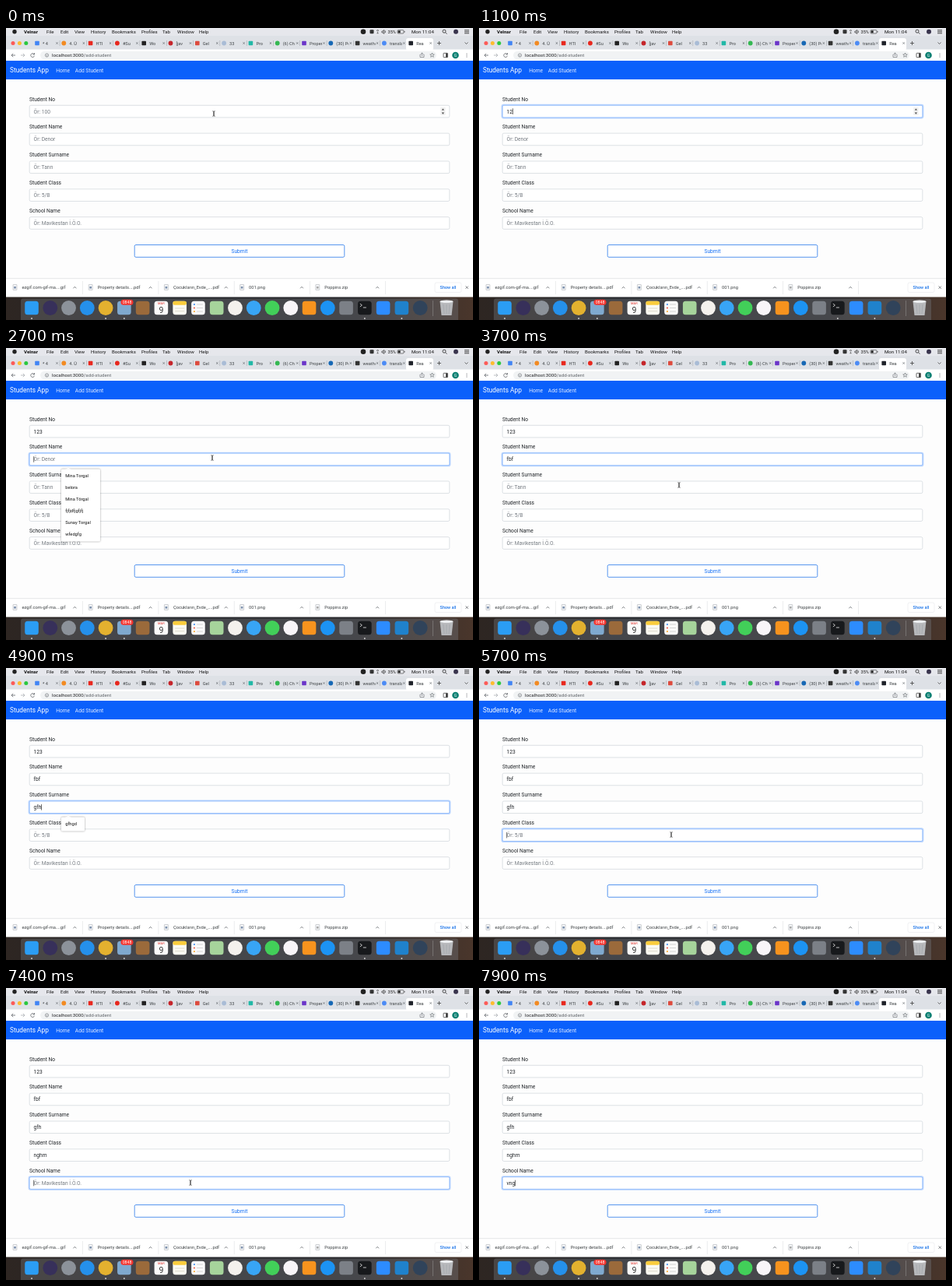
An HTML page for the animation above (8000 ms loop, 600 by 375 pixels).

```html
<!DOCTYPE html>
<html lang="en">
<head>
<meta charset="utf-8">
<title>Add Student</title>
<style>
html, body { margin: 0; width: 100%; height: 100%; overflow: hidden; background: #fdfdfd; }
svg { display: block; width: 600px; height: 375px; font-family: Roboto, "Liberation Sans", sans-serif; }
text { white-space: pre; }
</style>
</head>
<body>
<svg viewBox="0 0 600 375"><g id="base"></g><g id="live"></g></svg>
<script>
const LOOP = 8000, STEP = 100, BLUE = '#0b60fb', FORM = 6.67;

// Shape helpers; text is placed by its vertical centre.
const rect = (x, y, w, h, fill, r = 0, extra = '') =>
  `<rect x="${x}" y="${y}" width="${w}" height="${h}" rx="${r}" fill="${fill}" ${extra}/>`;
const disc = (x, y, r, fill, extra = '') =>
  `<circle cx="${x}" cy="${y}" r="${r}" fill="${fill}" ${extra}/>`;
const line = (d, stroke = '#5f6368', w = 0.8, extra = '') =>
  `<path d="${d}" fill="none" stroke="${stroke}" stroke-width="${w}" ${extra}/>`;
const text = (x, y, s, size, fill = '#212529', extra = '') =>
  `<text x="${x}" y="${y + size * 0.36}" font-size="${size}" fill="${fill}" ${extra}>${s}</text>`;
const cross = (x, y, r, color, w) =>
  line(`M${x - r} ${y - r}l${2 * r} ${2 * r}m0 ${-2 * r}l${-2 * r} ${2 * r}`, color, w);

const fields = [
  { label: 'Student No', hint: 'Ör: 100', value: '123', focus: 500, keys: [900, 1000, 1300] },
  { label: 'Student Name', hint: 'Ör: Denor', value: 'fbf', focus: 2300, keys: [2900, 3000, 3100] },
  { label: 'Student Surname', hint: 'Ör: Tarın', value: 'gfh', focus: 3900, keys: [4500, 4700, 4800] },
  { label: 'Student Class', hint: 'Ör: 5/B', value: 'nghm', focus: 5600, keys: [6000, 6100, 6300, 6400] },
  { label: 'School Name', hint: 'Ör: Mavikestan İ.Ö.O.', value: 'vng', focus: 7000, keys: [7500, 7600, 7700] }
];
fields.forEach((f, i) => f.y = 107.1 + 35.85 * i);

const menus = [
  { field: 1, from: 2300, to: 2900, width: 50,
    rows: ['Mina Torgal', 'belora', 'Mina Törgal', 'fjfjdfjgfjfj', 'Sunay Torgal', 'wfedgfg'] },
  { field: 1, from: 2900, to: 3000, width: 50, rows: ['fjfjdfjgfjfj'] },
  { field: 2, from: 4500, to: 5500, width: 30, rows: ['gfhgd'] }
];

// Pointer path as [time, x, y]; it hides while keys are pressed.
const path = [
  [0, 267, 110], [400, 267, 108], [1700, 266, 107], [2300, 265, 141], [3300, 265, 141],
  [3700, 257, 176], [3900, 257, 179], [5000, 257, 179], [5500, 247, 214],
  [6500, 247, 214], [6700, 237, 244], [6900, 237, 250], [LOOP, 237, 250]
];
const hidden = [[900, 1700], [2900, 3300], [4500, 5000], [6000, 6500], [7500, LOOP]];

function menuBar() {
  const items = [[52, 'File'], [70, 'Edit'], [88, 'View'], [109, 'History'], [136, 'Bookmarks'],
    [174, 'Profiles'], [201, 'Tab'], [220, 'Window'], [248, 'Help']];
  return rect(0, 0, 600, 10, '#e6e7ec') + disc(11, 4.8, 2.7, '#222') +
    text(23, 4.8, 'Velnar', 6.2, '#111', 'font-weight="700"') +
    items.map(([x, s]) => text(x, 4.8, s, 6.1, '#111')).join('') +
    disc(459, 4.8, 3.3, '#222') + rect(467.5, 2.3, 5, 5, '#333', 1) +
    line('M476 3.5q1.5-1.5 3 0m-2 1.6h1m-1.5 1.6h2', '#333') +
    line('M483 4v2h1.2l1.5 1.4V2.6L484.200 4zM487 3.300q1 1.500 0 3', '#222', 0.7) +
    text(490.500, 4.8, '35%', 5.6, '#111') +
    rect(503, 2.7, 8, 4.3, 'none', 1, 'stroke="#333" stroke-width=".6"') +
    rect(503.7, 3.4, 3, 2.9, '#222') + rect(511.6, 4, 0.8, 1.6, '#333') +
    text(521, 4.8, 'Mon 11:04', 6.1, '#111') +
    disc(563, 4.2, 2, 'none', 'stroke="#222" stroke-width=".8"') + line('M564.500 5.700l2 2', '#222') +
    disc(578, 4.8, 3, '#39344d') + line('M589 2.800h6m-6 2h6m-6 2h6', '#222');
}

function tabs() {
  const list = [['* 4', '#4285f4'], ['4. \u00dc', '#f28b23'], ['HTI', '#e8281e'], ['#Su', '#e8281e'],
    ['Wo', '#222'], ['[jav', '#c5252b'], ['Gel', '#dd4b3e'], ['33', '#a9bcd6'], ['Pro', '#22b8a7'],
    ['(6) Ch', '#34b852'], ['Proper', '#6b35c9'], ['(30) Po', '#1768b5'], ['weathe', '#333'],
    ['transla', '#4c8bf5'], ['Rea', '#20232a']];
  let out = rect(0, 10, 600, 18, '#dee1e6') + rect(514, 13, 35, 16, '#fff', 3);
  ['#fc5b57', '#fdbc2e', '#2bc840'].forEach((c, i) => out += disc(9 + 8.4 * i, 19.5, 2.5, c));
  list.forEach(([s, color], i) => {
    const x = 40 + 34.3 * i;
    out += i % 2 ? disc(x, 19.5, 2.9, color) : rect(x - 2.8, 16.7, 5.6, 5.6, color, 0.8);
    out += `<svg x="${x + 6}" y="14" width="17" height="11">${text(1, 5.5, s, 5.6, '#3c4043')}</svg>`;
    out += cross(x + 25.5, 19.5, 1.2, '#4b4f54', 0.6);
    if (i < 13) out += rect(x + 28.8, 16, 0.5, 7, '#9b9fa5');
  });
  return out + line('M554 19.500h5m-2.500-2.500v5', '#444') + line('M589.500 18.500l2 2 2-2', '#444');
}

function toolbar() {
  return rect(0, 27.5, 600, 15, '#fff') + rect(44, 29.700, 509, 10.6, '#f1f3f4', 5.3) +
    line('M12 35H7m2.200-2.200L7 35l2.200 2.200') +
    line('M19 35h5m-2.200-2.200L24 35l-2.200 2.200', '#a9adb2') +
    line('M36 33.500a2.400 2.400 0 1 0 .5 2.200m0-3.700v2h-2') +
    disc(52.5, 35, 2.1, 'none', 'stroke="#5f6368" stroke-width=".6"') + rect(52.2, 34.600, 0.6, 1.6, '#5f6368') +
    text(59, 35, 'localhost:3000<tspan fill="#5f6368">/add-student</tspan>', 6.2, '#202124') +
    line('M533 34h-1v3.500h5V34h-1m-1.500 2v-4m-1.300 1.200l1.300-1.300 1.300 1.300', '#5f6368', 0.6) +
    line('M547.500 32l.8 1.900 2 .1-1.600 1.300.6 2-1.800-1.100-1.800 1.100.6-2-1.600-1.300 2-.1z', '#5f6368', 0.6) +
    rect(562, 32.300, 5.4, 5.400, 'none', 0.5, 'stroke="#444" stroke-width=".8"') + rect(565, 32.300, 2.4, 5.4, '#444') +
    disc(577.500, 35, 4.3, '#0b8073') + text(577.500, 35, 'G', 5, '#fff', 'text-anchor="middle"') +
    [-2, 0, 2].map(d => disc(592, 35 + d, 0.6, '#5f6368')).join('');
}

function page() {
  return rect(0, 42, 600, 24, BLUE) + text(5, 54.5, 'Students App', 8.33, '#fff') +
    text(64.2, 54.5, 'Home', FORM, '#dfe9ff') + text(88.800, 54.5, 'Add Student', FORM, '#dfe9ff') +
    fields.map(f => text(30, f.y - 16, f.label, FORM)).join('') +
    rect(165.2, 278.500, 269.6, 15.8, '#fff', 1.7, 'stroke="#2c7ceb" stroke-width=".8"') +
    text(300, 286.5, 'Submit', FORM, '#1470f5', 'text-anchor="middle"');
}

function downloads() {
  const files = ['ezgif.com-gif-ma....gif', 'Property details....pdf', 'Çocukların_Evde_....pdf', '001.png', 'Poppins.zip'];
  let out = rect(0, 321.5, 600, 24, '#fff') + rect(0, 321.5, 600, 0.6, '#d5d7da');
  files.forEach((s, i) => {
    const x = 97.2 * i;
    out += rect(x + 9, 329.5, 5, 7, '#f3f4f6', 0.4, 'stroke="#a5a9af" stroke-width=".5"') +
      rect(x + 10.2, 332, 2.6, 2.6, i < 4 ? '#7d91ad' : '#aaa') +
      text(x + 20.5, 333.2, s, 5.75, '#3c4043') +
      line(`M${x + 86.5} 334.300l1.900-2 1.900 2`) + rect(x + 98.5, 325, 0.5, 17, '#d8dadd');
  });
  return out + rect(551, 327, 34, 12.5, '#fff', 2, 'stroke="#e1e3e6" stroke-width=".5"') +
    text(568, 333.2, 'Show all', 5.5, '#1a73e8', 'text-anchor="middle" font-weight="500"') +
    cross(592.2, 333.2, 1.7, '#55595e', 0.7);
}

function dock() {
  const y = 359.5;
  const tile = (x, color) => rect(x - 8.8, y - 8.8, 17.6, 17.6, color, 3.5);
  const round = (x, color) => disc(x, y, 9.4, color);
  const icons = [[tile, '#2b9df4'], [round, '#37305a'], [round, '#8c929a'], [round, '#2590ea'], [round, '#e3b12f'],
    [tile, '#7fa9cf'], [tile, '#9b6a3b'], [tile, '#fafafa'], [tile, '#fbfaf2'], [tile, '#fafafa'],
    [tile, '#a6d49b'], [round, '#f4f1ed'], [round, '#38a5f5'], [round, '#42cf59'], [round, '#f8f5f8'],
    [tile, '#f7931e'], [round, '#1c93f3'], [tile, '#7c8087'], [tile, '#17191c'], [tile, '#2d8cff'],
    [tile, '#1f82cc'], [round, '#30435a']];
  const at = i => 33 + 23.77 * i;
  let out = `<defs><linearGradient id="desk"><stop stop-color="#2e2622"/><stop offset=".3" stop-color="#25272c"/>
    <stop offset=".75" stop-color="#29292c"/><stop offset="1" stop-color="#4a362b"/></linearGradient></defs>` +
    rect(0, 345.500, 600, 30, 'url(#desk)') + rect(19, 347.5, 562, 30, '#77797f', 3, 'opacity=".38"');
  icons.forEach(([draw, color], i) => out += draw(at(i), color));
  [0, 4, 5, 18, 20].forEach(i => out += disc(at(i), 373, 0.9, '#ddd'));

  // Plain details: badge, calendar, notes, list, prompt and bin.
  out += rect(147.500, 348.8, 16, 7, '#f6352f', 3.500) + text(155.500, 352.3, '0848', 5.2, '#fff', 'text-anchor="middle"');
  out += text(at(7), 354, 'MAR', 4, '#e33b35', 'text-anchor="middle"') +
    text(at(7), 362, '9', 10.5, '#333', 'text-anchor="middle"');
  out += rect(at(8) - 8.8, 350.7, 17.6, 5, '#fbcd3c', 2) + line(`M${at(8) - 6} 360h12m-12 3.500h12`, '#c9c6bb', 0.6);
  [355, 359.5, 364].forEach((py, i) =>
    out += disc(at(9) - 5, py, 1.1, ['#3a8cf1', '#f25a4b', '#f7a52b'][i]) + line(`M${at(9) - 2} ${py}h8`, '#bbb', 0.6));
  out += line(`M${at(18) - 6} 354l2.500 2-2.500 2m4 1h4`, '#eee', 0.8);
  out += rect(548.5, 350, 0.5, 20, '#999');
  return out + '<path d="M557.500 351h17l-2 18h-13z" fill="#c9ccd0" opacity=".85"/>' +
    '<ellipse cx="566" cy="351.300" rx="8.500" ry="1.800" fill="#eceef0"/>' +
    line('M562 355l1 12m3-12v12m4-12l-1 12', '#9da1a6', 0.6);
}

const ruler = document.createElement('canvas').getContext('2d');
function widthOf(s) {
  ruler.font = '100px Roboto, "Liberation Sans", sans-serif';
  return ruler.measureText(s).width * FORM / 100;
}

function pointerAt(t) {
  if (hidden.some(([a, b]) => t >= a && t < b)) return null;
  const i = path.findIndex(p => p[0] > t);
  const [t0, x0, y0] = path[i - 1], [t1, x1, y1] = path[i];
  const k = (t - t0) / (t1 - t0), e = k * k * (3 - 2 * k);
  return [x0 + (x1 - x0) * e, y0 + (y1 - y0) * e];
}

function input(f, i, t, active, hover) {
  const typed = f.value.slice(0, f.keys.filter(k => k <= t).length);
  let out = '';
  if (active) out += rect(28.6, f.y - 9.3, 542.8, 18.6, '#bcd6fe', 2.8);
  out += rect(30.2, f.y - 7.8, 539.6, 15.6, '#fff', 1.7,
    `stroke="${active ? '#79adfa' : '#ced4da'}" stroke-width=".7"`);
  out += text(35.6, f.y, typed || f.hint, FORM, typed ? '#212529' : '#747a80');
  if (active) {
    const last = Math.max(f.focus, ...f.keys.filter(k => k <= t));
    if ((t - last) % 1000 < 500) out += rect(35.5 + widthOf(typed), f.y - 3.8, 0.6, 7.6, '#111');
  }
  if (i === 0 && (active || hover)) {
    out += rect(558.3, f.y - 5, 6.2, 10, '#efefef', 0.5) +
      `<path d="M559.800 ${f.y - 1.5}l1.600-2.200 1.600 2.200zm0 3l1.600 2.200 1.600-2.200z" fill="#444"/>`;
  }
  return out;
}

function suggestions({ field, rows, width }) {
  const top = fields[field].y + 12.6, h = rows.length * 15 + 3;
  return rect(71, top, width, h, '#fff', 1.5, 'style="filter:drop-shadow(0 .6px 1px #0006)"') +
    `<path d="M77 ${top + 0.3}l3-2.700 3 2.700z" fill="#fff" stroke="#ddd" stroke-width=".3"/>` +
    rect(76.5, top, 7, 1, '#fff') +
    rows.map((s, i) => text(76.2, top + 8.4 + 15 * i, s, 5.7, '#111')).join('');
}

function pointer([x, y], beam) {
  if (beam) {
    const d = `M${x - 1.6} ${y - 3.3}q1.600 0 1.600 1v4.600q0 1-1.600 1m3.200 0q-1.600 0-1.600-1v-4.600q0-1 1.600-1`;
    return line(d, '#fff', 1.4) + line(d, '#222', 0.7);
  }
  return `<path d="M${x - 0.7} ${y - 2.7}v5.600l1.300-1.200.9 2 .9-.4-.9-1.900h1.800z" fill="#111" stroke="#fff" stroke-width=".4"/>`;
}

const live = document.getElementById('live');
document.getElementById('base').innerHTML = rect(0, 0, 600, 375, '#fdfdfd') +
  menuBar() + tabs() + toolbar() + page() + downloads() + dock();

function draw(t) {
  const active = fields.filter(f => f.focus <= t).length - 1;
  const mouse = pointerAt(t);
  const over = mouse ? fields.findIndex(f => Math.abs(mouse[1] - f.y) < 8) : -1;
  live.innerHTML = fields.map((f, i) => input(f, i, t, i === active, i === over)).join('') +
    menus.filter(m => t >= m.from && t < m.to).map(suggestions).join('') +
    (mouse ? pointer(mouse, over >= 0) : '');
}

const start = performance.now();
let shown = -1;
function tick() {
  const t = Math.floor((performance.now() - start) % LOOP / STEP) * STEP;
  if (t !== shown) draw(shown = t);
  requestAnimationFrame(tick);
}
tick();
</script>
</body>
</html>
```
